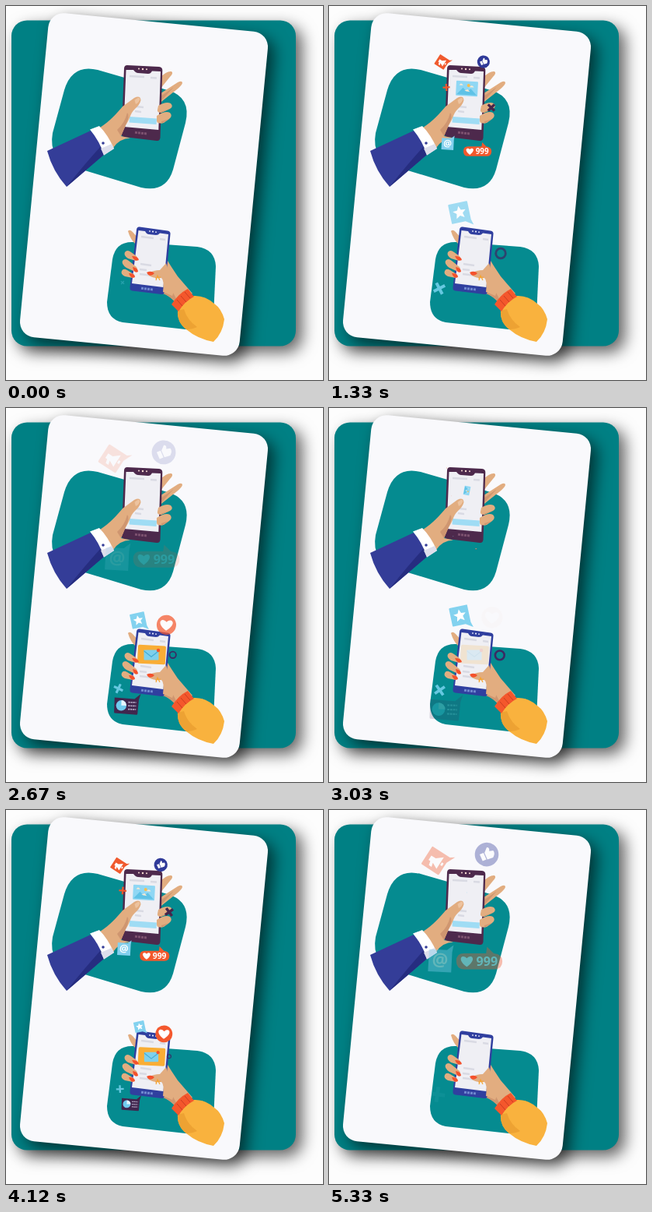
These frames come from a looping animation (408 px wide and 480 px high, 5360 ms). An HTML page:

```html
<!DOCTYPE html>
<html lang="en">
<head>
<meta charset="utf-8">
<title>Two hands with phones</title>
<style>
html, body { margin: 0; width: 100%; height: 100%; overflow: hidden; background: #fdfdfd; }
svg { display: block; width: 408px; height: 480px; }
.panel { filter: drop-shadow(8px 8px 10px rgba(0, 0, 0, .62)); }
.skin { fill: #e2ad80; }
.shade { fill: #cf9670; }
.nail { fill: #f4512c; }
.grey { fill: none; stroke: #d9dae3; stroke-width: 2.4; }
.white { fill: #fff; }
text { font-family: "Open Sans", "Noto Sans", sans-serif; font-weight: 700; fill: #fff; text-anchor: middle; }
</style>
</head>
<body>
<svg viewBox="0 0 408 480">
  <rect class="panel" x="7" y="18.5" width="366" height="418" rx="20" fill="#008084"/>
  <g class="panel">
    <rect x="35.500" y="20" width="284" height="418" rx="20" fill="#f9f9fc" transform="rotate(5.5 177.5 229)"/>
  </g>

  <!-- upper hand -->
  <path fill="#058b90" d="M118 82L208 108Q239 117 231 150L215 210Q206 240 174 233L88 207Q54 197 60 163L75 108Q85 74 118 82Z"/>
  <path class="skin" d="M198 92Q207 83 213 84Q216 86 211 91L198 107ZM196 114L221 98Q227 95 227 99Q226 102 220 107L196 126Z"/>
  <path class="shade" d="M196 118L216 104L196 126Z"/>
  <path fill="#4d294c" d="M156 76L197 78Q201.500 78.500 201.300 83L198.500 169Q198 173.500 194 173L152 168Q148.500 167.500 148.800 163L152 80Q152.300 76 156 76Z"/>
  <path fill="#efeff4" d="M154.500 82L164 82Q167 86 170 86L183 87Q186 87 188 83.500L199 84L196.300 159L151.500 155Z"/>
  <g fill="#f6dcd2"><circle cx="171" cy="80.500" r="1"/><circle cx="176" cy="81" r="1.200"/><circle cx="181" cy="81.300" r="1"/></g>
  <path class="grey" d="M159 90L178 91M186 92L194 92.500M167 129L177 130M166 135L174 136"/>
  <path fill="#9fdcf4" d="M159 142L194 144.500L193.500 152L158.500 149.500Z"/>
  <path fill="none" stroke="#7d5270" stroke-width="3" stroke-dasharray="3 1" d="M166 162.300L182 164"/>
  <g id="photo">
    <rect x="-14" y="-9.500" width="28" height="19" rx="1" fill="#8fd7f4"/>
    <path fill="#5fc2e6" d="M-13 8L-5 -1L0 4L5 0L13 8Z"/>
    <path fill="#fbead2" d="M-10 -4Q-8 -8 -5 -4ZM3 -2Q6 -6 9 -2ZM-3 3L1 1L4 4Z"/>
    <circle cx="2" cy="-4" r="2" fill="#f8bd4e"/>
  </g>
  <path class="skin" d="M121 156C134 148 143 137 150 129L165 118Q173 114 173.500 121Q172 127 166 132C159 139 160 145 154 153L148 167L160 169.500Q146 170 138 182Z"/>
  <path class="shade" d="M143 159Q153 150 156 137Q160 140 154 153L148 167Z"/>
  <path fill="#edc39f" d="M165.500 121Q172 115 172.500 120Q171 124 167 126Z"/>
  <path class="skin" d="M196 128Q206 122 212 125Q216 129 211 132L200 137Q194 137 195 133ZM194 141Q205 134 211 137Q215 141 210 145L203 150Q194 152 194 147Z"/>
  <path class="shade" d="M199 137L211 132L200 135.500ZM200 151L210 145L200 148Z"/>
  <path fill="#343d98" d="M53 186L109 160Q121 172 127 190L78 232Q60 212 53 186Z"/>
  <path fill="#262d80" d="M78 232Q101 203 123 179L127 190Z"/>
  <path fill="#fff" d="M108 158.500L120 154Q131 165 139 183L126 191.500Q121 174 108 158.500Z"/>
  <path fill="#dedfec" d="M122 183L136 177L139 183L126 191.500Z"/>
  <circle cx="125" cy="176" r="1.800" fill="#343d98"/>

  <!-- lower hand -->
  <path fill="#058b90" d="M164 303L246 309Q269 312 270 334L267 398Q265 418 240 416L150 406Q130 402 130 380L137 325Q141 302 164 303Z"/>
  <path class="skin" d="M157 289Q159 286 163 290L170 298L168 307Q160 300 157 289ZM205 322Q212 334 221 347L240 369L219 382Q213 373 200 368Z"/>
  <path class="shade" d="M206 355Q214 364 221 380L218 381Q212 372 200 368Z"/>
  <path fill="#303f9f" d="M172 283.500L208 288.500Q212 289 211.500 293L204 367Q203.500 370.500 200 370L162.500 365.500Q159 365 159.500 361L168 287Q168.500 283 172 283.500Z"/>
  <path fill="#efeff4" d="M170.500 288L179 289Q181 293 184 293L193 294Q196 294 198 291.500L209 293L202.500 361L162 356Z"/>
  <g fill="#e5e8fa"><circle cx="185" cy="289" r=".9"/><circle cx="189" cy="289.600" r="1.100"/><circle cx="193" cy="290.200" r=".9"/></g>
  <path class="grey" d="M174 296L190 298M198 299L205 300M173 331L187 333M172 338L181 339M172 344L189 346"/>
  <path fill="none" stroke="#7089d0" stroke-width="3" stroke-dasharray="3 1" d="M174 362.200L189 364"/>
  <g id="mail">
    <rect x="-17.500" y="-11.500" width="36" height="24" rx="2" fill="#f9ad35"/>
    <g transform="rotate(-3)">
      <rect x="-9.500" y="-5.500" width="19" height="13" rx="1" fill="#7fd0ec"/>
      <path fill="#41abd4" d="M-9.500 -5L0 2.500L9.500 -5V-3.500L0 4L-9.500 -3.500Z"/>
      <circle cx="9" cy="-5" r="2.200" fill="#f4512c"/>
    </g>
  </g>
  <path class="skin" d="M153 316Q156 312 161 316L168 321Q171 325 167 327L157 324Q151 320 153 316ZM150 327Q153 323 158 327L168 335Q171 340 166 341L155 336Q148 331 150 327ZM149 340Q151 336 156 339L164 344Q167 348 163 349L153 347Q147 344 149 340Z"/>
  <path class="nail" d="M162 321Q170 321 171 326Q166 329 162 321ZM163 335Q170 336 170 341Q165 344 163 335ZM158 343Q166 343 166 348Q161 351 158 343Z"/>
  <path class="skin" d="M183 343Q190 339 198 339L206 330Q210 346 220 356L214 372L202 367Q204 352 200 349Q191 350 184 346Z"/>
  <path class="nail" d="M181 342Q187 339 191 343Q188 347 183 345Z"/>
  <path fill="none" stroke="#f5a431" stroke-width="1.200" d="M193 352L195 346L198 352M192 349L199 348"/>
  <path fill="#f9b23e" d="M221 391Q229 380 241 372Q256 371 268 382Q277 388 281 402Q279 420 267 431Q246 427 232 415Q220 406 221 391Z"/>
  <path fill="#eda233" d="M221 391L229 389Q233 403 246 412Q240 415 232 415Q220 406 221 391Z"/>
  <path fill="#f4572c" d="M213 383Q222 369 234 363L242 373Q230 379 222 392Z"/>
  <path fill="none" stroke="#c93d20" d="M220 377L227 385M225 372L232 380M230 367L237 375"/>

  <!-- floating icons -->
  <g id="mega">
    <path fill="#f05a2e" d="M-9 -10H10L14 -13L10 -4V9Q10 10 9 10H-9Q-10 10 -10 9V-9Q-10 -10 -9 -10Z"/>
    <path class="white" d="M-6 -2H-1L5 -7V6L-1 3L0 7H-3L-4 3H-6ZM6 -2H8V1H6Z"/>
  </g>
  <g id="like">
    <circle r="12" fill="#303a99"/>
    <path class="white" d="M-7 -1L-3 -2L-1 5L-5 6ZM-2 -2L1 -7Q4 -7 3 -3L7 -3Q9 0 6 4L0 5Z"/>
  </g>
  <g id="at">
    <path fill="#83d0ee" d="M-11 -10H6L12 -15L11 -8V11H-11Z"/>
    <text y="5.500" font-size="17">@</text>
  </g>
  <g id="count">
    <path fill="#f2582c" d="M-16 -8H7L8 -15L15 -8Q24 -7 24 0Q24 8 16 8.500H-16Q-24 8 -24 0Q-24 -8 -16 -8Z"/>
    <path class="white" d="M-13 6C-24 -2 -18 -8 -13 -3C-8 -8 -2 -2 -13 6Z"/>
    <text x="8" y="5" font-size="13">999</text>
  </g>
  <path id="spark" stroke="#f2582c" stroke-width="3.200" d="M-6.500 0H6.500M0 -6.500V6.500"/>
  <path id="cross" stroke="#46264b" stroke-width="5" d="M-9 0H9M0 -9V9"/>
  <g id="star">
    <path fill="#83d2ef" d="M-11 -12H11Q12 -12 12 -11V11L14 18L5 12H-11Q-12 12 -12 11V-11Q-12 -12 -11 -12Z"/>
    <path class="white" d="M0 -8L2.300 -3L8 -2.500L3.700 1.200L5 7L0 4L-5 7L-3.700 1.200L-8 -2.500L-2.300 -3Z"/>
  </g>
  <g id="heart">
    <circle r="12" fill="#f4582e"/>
    <path class="white" d="M0 7C-14 -2 -6 -10 0 -3.500C6 -10 14 -2 0 7Z"/>
  </g>
  <circle id="ring" r="6.300" fill="none" stroke="#3b2a63" stroke-width="2.800"/>
  <g id="chart">
    <path fill="#40264e" d="M-14 -9L9 -8L16 -14L14 -7L13 9Q13 10 12 10L-13 9Q-14 9 -14 8Z"/>
    <circle cx="-6" cy="0" r="6" fill="#70cbee"/>
    <path fill="#e6f7ff" d="M-6 0V-6A6 6 0 0 1 0 0Z"/>
    <path stroke="#b9adc8" stroke-width="1.500" stroke-dasharray="2 .7" d="M2 -4H11M2 0H11M2 4H11"/>
  </g>
  <path id="plus" stroke="#66c8e0" stroke-width="4.400" d="M-9 0H9M0 -9V9"/>
</svg>
<script>
const LOOP = 5360;
const ramp = (t, a, b) => Math.max(0, Math.min(1, (t - a) / (b - a)));
const easeOut = v => 1 - (1 - v) ** 2;
const mix = (a, b, k) => a.map((v, i) => v + (b[i] - v) * k);

function put(id, [x, y, scale], angle, alpha) {
  const el = document.getElementById(id);
  el.setAttribute("transform", `translate(${x} ${y}) rotate(${angle}) scale(${Math.max(scale, 0)})`);
  el.setAttribute("opacity", alpha);
}

// Drift between two [x, y, scale] poses, grown from nothing by pop.
const drifter = (k, pop) => (id, from, to, angle, alpha) => {
  const [x, y, s] = mix(from, to, k);
  put(id, [x, y, s * pop], angle, alpha);
};

function drawUpper(t) {
  const drift = drifter((t - 740) / 1920, easeOut(ramp(t, 330, 680)));
  const out = 1 - ramp(t, 2595, 2684);
  const early = 1 - ramp(t, 2440, 2600);
  drift("mega", [149, 75, .45], [137, 65, 1.35], 33, out);
  drift("like", [197, 78, .4], [203, 57, 1.28], -8, out);
  drift("at", [157, 169.5, .42], [143, 193, 1.36], 3, out);
  drift("count", [190, 183, .54], [193.5, 194, 1.24], 0, out);
  drift("spark", [155, 109.5, .5], [142, 93, 1.15], 45 + (t - 740) * .07, early);
  drift("cross", [203, 127, .4], [222, 138, 1.2], 45 + (t - 1330) * .08, early);
  const enter = ramp(t, 220, 790);
  const leave = ramp(t, 1950, 2660);
  const size = easeOut(enter) * (1 - leave ** 2);
  put("photo", [177.5, 106, size], 340 * (enter - 1) + 3 + 90 * leave, 1);
}

function drawLower(t) {
  const pop = easeOut(ramp(t, 250, 620));
  const drift = drifter((t - 730) / 600, pop);
  const late = 1 - ramp(t, 1270, 1520);
  const middle = 1 - ramp(t, 940, 1310);
  drift("star", [171, 275, .7], [168, 265, 1.05], -12, late);
  drift("heart", [205, 282.5, 1], [210.6, 266.5, 1.18], 3, 1 - ramp(t, 740, 1250));
  drift("ring", [212.5, 316.5, .55], [221, 317.5, 1], 0, late);
  drift("chart", [157.5, 380, 1], [148, 388, 1.46], 2, middle);
  put("mail", [187, 316, pop], 3, middle);
  const fade = ramp(t, -60, 120) * (1 - ramp(t, 1560, 1775));
  put("plus", mix([150, 355, .3], [140, 364.5, 1.05], t / 1663), 90 - (1663 - t) * .083, fade);
}

function frame(now) {
  const t = now % LOOP;
  drawUpper(t % (LOOP / 2));
  drawLower(t % (LOOP / 3));
  requestAnimationFrame(frame);
}
frame(0);
</script>
</body>
</html>
```
